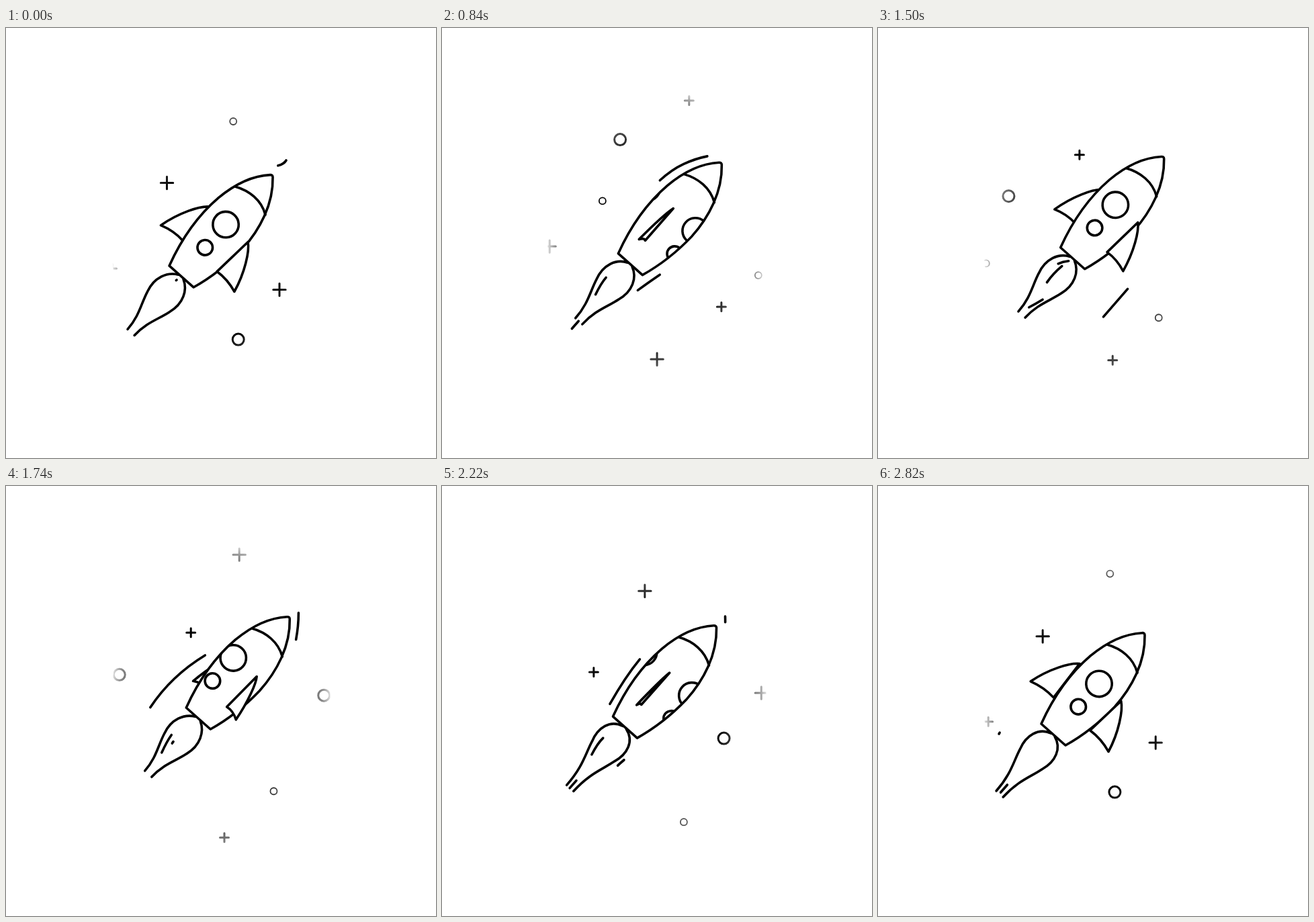
Animation of 640 by 640 pixels, one loop 2.88 s. Source, as an HTML page with a canvas:

```html
<!DOCTYPE html>
<html lang="en">
<head>
<meta charset="utf-8">
<title>Rocket</title>
<style>
html, body { margin: 0; width: 100%; height: 100%; overflow: hidden; background: #fff; }
canvas { display: block; }
</style>
</head>
<body>
<canvas id="stage" width="640" height="640"></canvas>
<script>
const ctx = document.getElementById('stage').getContext('2d');
const LOOP = 2880, QUARTER = 720, STEP = 60;
const wrap = (n, size) => ((n % size) + size) % size;
const wave = turns => (1 - Math.cos(turns * 2 * Math.PI)) / 2;

const body = new Path2D('M243 354C262 312 288 277 316 253C340 233 367 220 393 218.7Q397 218.5 397 222C398 262 378 300 352 329C330 352 306 371 279 386Z');
const noseArc = new Path2D('M341 236C362 242 380 256 386 278');

// Streaks run along fixed tracks beside the ship and inside its flame
const track = (path, speed, length, starts) => ({ path: new Path2D(path), speed, length, starts });
const tracks = [
  track('M417 197C408 212 385 200 340 221C297 241 260 293 225 360', .52, 80, [-29, 600, 1764]),
  track('M271 276C238 296 205 325 180 369', .52, 115, [1522, 2350]),
  track('M410 205C411 235 406 258 400 278C385 320 350 355 323 373C305 386 270 408 250 427', .56, 40, [375, 1655, 2205]),
  track('M346 412L300 465', .52, 55, [1385]),
  track('M255 374C235 376 222 386 206 422', .23, 30, [557, 1430, 1959]),
  track('M254 375C245 381 232 392 222 407', .13, 33, [-8, 1160]),
  track('M258 380C262 398 240 420 196 443', .25, 25, [310, 1120]),
  track('M201 435L173 467', .5, 15, [312, 758, 2152, 2764])
];

// Stars drift in one direction; each crosses the middle line at its own time and offset
const DRIFT = { x: -.643, y: .766 };
const bigRing = (x, y) => ring(x, y, 8.5, 3);
const smallRing = (x, y) => ring(x, y, 5, 1.8);
const bigPlus = (x, y) => plus(x, y, 9.2);
const smallPlus = (x, y) => plus(x, y, 6.5);
const star = (shape, time, offset, speed) => ({ shape, time, offset, speed });
const stars = [
  star(bigRing, 2343, 112, .174),
  star(bigRing, 1336, -141, .1665),
  star(smallRing, 817, -102.4, .184),
  star(smallRing, 1321, 146.4, .125),
  star(bigPlus, 114, -119.2, .147),
  star(bigPlus, 17, 111.3, .161),
  star(smallPlus, 769, 134.5, .157),
  star(smallPlus, 2047, -99.7, .16)
];

function ring(x, y, r, width) {
  ctx.lineWidth = width;
  ctx.beginPath();
  ctx.arc(x, y, r, 0, 7);
  ctx.stroke();
}

function plus(x, y, r) {
  ctx.lineWidth = 3;
  ctx.beginPath();
  ctx.moveTo(x - r, y);
  ctx.lineTo(x + r, y);
  ctx.moveTo(x, y - r);
  ctx.lineTo(x, y + r);
  ctx.stroke();
}

const haze = ctx.createRadialGradient(0, 0, 0, 0, 0, 1);
[[.58, 0], [.8, .32], [.93, .55], [.995, .85], [1, 1]].forEach(([at, alpha]) =>
  haze.addColorStop(at, `rgba(255,255,255,${alpha})`));

function drawStars(t) {
  for (const { shape, time, offset, speed } of stars) {
    const d = speed * (wrap(t - time + LOOP / 2, LOOP) - LOOP / 2);
    shape(320 + DRIFT.x * d + DRIFT.y * offset, 320 + DRIFT.y * d - DRIFT.x * offset);
  }
  // Fade to white towards the edge of an ellipse
  ctx.save();
  ctx.transform(163, 0, 0, 235, 320, 320);
  ctx.fillStyle = haze;
  ctx.fillRect(-3, -3, 6, 6);
  ctx.restore();
}

// Ship axes: x points to its left side, y runs from the nose to the base
function alongShip(paint) {
  ctx.save();
  ctx.transform(-.743, -.67, -.67, .743, 397, 219);
  paint();
  ctx.restore();
}

// Turn of the ship in quarters, 0 to 2; each quarter starts slowly
function spin(t) {
  const q = (t + 60) / QUARTER, y = q % 1;
  return (Math.floor(q) + y - .4 * y * (1 - y) ** 2) % 2;
}

function drawFin(u) {
  alongShip(() => {
    ctx.beginPath();
    ctx.moveTo(41.5 * u, 98.6);
    ctx.bezierCurveTo(53 * u, 107, 70 * u, 135, 78 * u, 167);
    ctx.quadraticCurveTo(57 * u, 160, 36.5 * u, 162);
    ctx.closePath();
    ctx.fill();
    ctx.stroke();
  });
}

function drawFlame(t) {
  const k = wave((t - 24) / 288);
  alongShip(() => {
    for (const side of [1, -1]) {
      ctx.beginPath();
      ctx.moveTo(side * (5 - 2 * k), 204);
      ctx.bezierCurveTo(side * (20 + 5 * k), 212 - 3 * k, side * 29.5, 231, side * 22.3, 254 - 3 * k);
      ctx.bezierCurveTo(side * 17.5, 273 - 2 * k, side * 7, 289, side * 6.8, 314 + 13 * k);
      ctx.stroke();
    }
  });
}

function drawWindows(turn) {
  ctx.save();
  ctx.clip(body);
  alongShip(() => {
    for (const side of [turn, turn - 2]) {
      ring(48 * side, 101.5, 19.2, 3.6);
      ring(48 * side, 147.5, 11.3, 3.6);
    }
  });
  ctx.restore();
}

function drawStreaks(t) {
  for (const { path, speed, length, starts } of tracks) {
    ctx.setLineDash([length, 9999]);
    for (const start of starts) {
      ctx.lineDashOffset = length - wrap(t - start, LOOP) * speed;
      ctx.stroke(path);
    }
  }
  ctx.setLineDash([]);
}

function draw(t) {
  ctx.fillStyle = '#fff';
  ctx.fillRect(0, 0, 640, 640);
  ctx.strokeStyle = '#000';
  ctx.lineCap = ctx.lineJoin = 'round';
  drawStars(t);

  const lift = 29 * wave((t + 36) / LOOP);
  const turn = spin(t);
  ctx.save();
  ctx.translate(lift, -.95 * lift);
  ctx.lineWidth = 3.6;
  drawFlame(t);
  drawFin(1 - turn);
  ctx.fill(body);
  ctx.stroke(body);
  ctx.stroke(noseArc);
  drawWindows(turn);
  drawFin(turn - 1);
  drawStreaks(t);
  ctx.restore();
}

const begin = performance.now();
function tick() {
  const t = (performance.now() - begin) % LOOP;
  draw(Math.floor(t / STEP) * STEP);
  requestAnimationFrame(tick);
}
tick();
</script>
</body>
</html>
```
